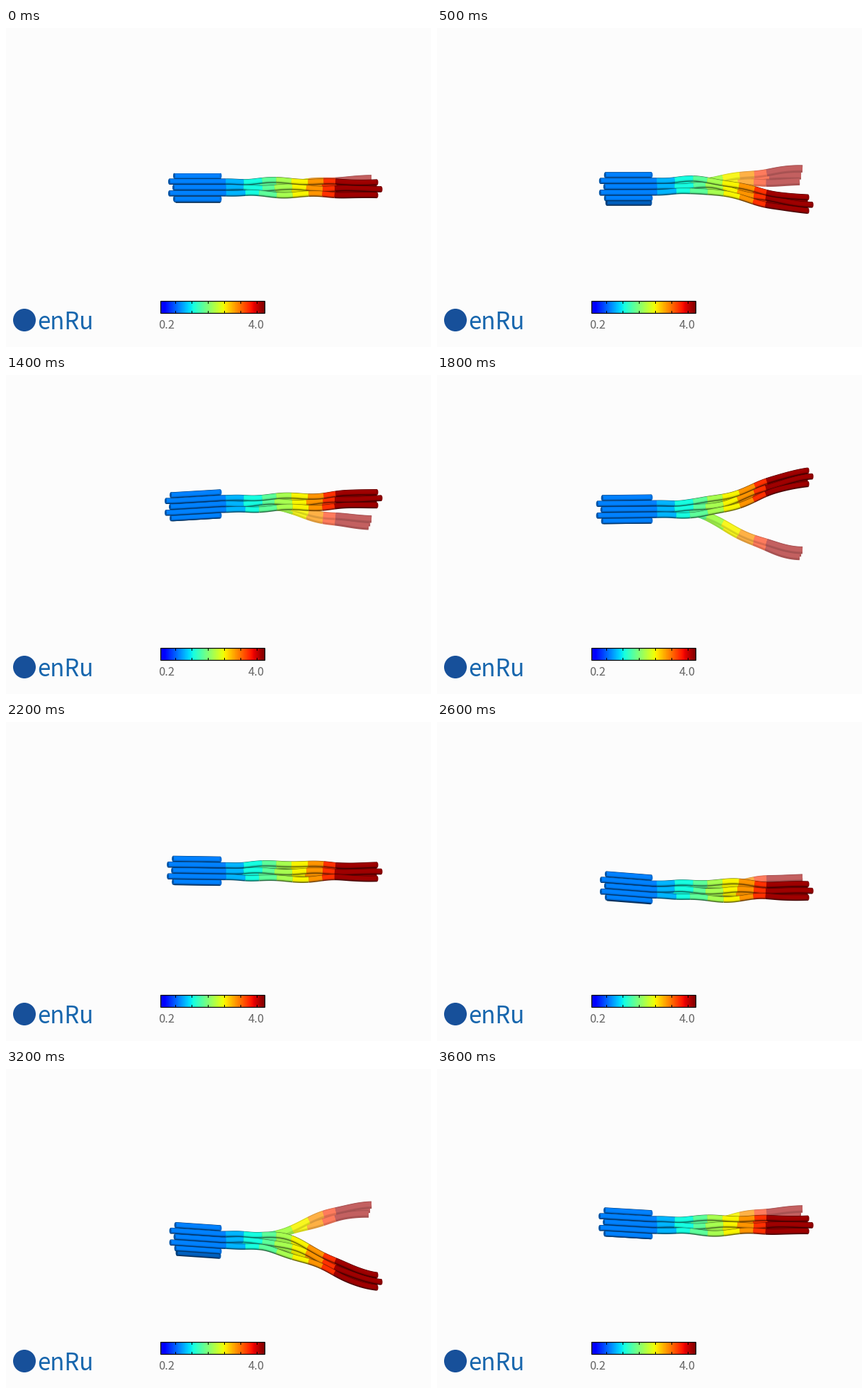
These frames come from a looping animation (600 px wide and 450 px high, 3700 ms). A matplotlib script:

```python
import numpy as np
import matplotlib.pyplot as plt
from matplotlib.animation import FuncAnimation
from matplotlib.collections import LineCollection
from matplotlib.patches import Circle, Ellipse, Rectangle

W, H, DPI = 600, 450, 100
FRAMES, STEP = 37, 100
LOOP = FRAMES * STEP
PX = 72 / DPI
BG = np.full(3, 252 / 255)
JET = plt.get_cmap("jet")

# Poses: time, body height, tilt, sag, front bend, back bend, back fork
POSES = np.array([
    [0, 225, 0, 0, 2, -9, 3],
    [500, 224, 0, -3, 25, -16, 9],
    [1000, 239, 4, 5, 3, -20, 3],
    [1400, 184, -4, -2, -8, 26, 5],
    [1600, 184, -2, -2, -45, 66, 5],
    [2200, 210, 1, 0, 1, -4, 3],
    [2900, 244, 7, 2, 11, -18, 5],
    [3300, 235, 4, 2, 62, -45, 6],
    [3600, 218, 4, 1, 0, -18, 4],
], float)

# Colour bands from the stiff block to the free ends
K = np.arange(9)
EDGES = 308 + 158 * (K[:8] / 7) ** 0.9
BANDS = JET(0.25 + 0.72 * (K / 8) ** 1.25)[:, :3]
JITTER = np.random.default_rng(4).uniform(-3, 3, (12, 8))


def ease(x, a, b):
    u = np.clip((x - a) / (b - a), 0, 1)
    return u * u * (3 - 2 * u)


def bump(x, mid, width):
    return np.exp(-((x - mid) / width) ** 2)


def pose_at(t):
    """Smooth periodic path through the poses."""
    shift = np.eye(7)[0] * LOOP
    keys = np.vstack([POSES[-2:] - shift, POSES, POSES[:2] + shift])
    times, vals = keys[:, 0], keys[:, 1:]
    slope = np.gradient(vals, times, axis=0)
    i = np.searchsorted(times, t, side="right") - 1
    h = times[i + 1] - times[i]
    u = (t - times[i]) / h
    return ((1 + 2 * u) * (1 - u) ** 2 * vals[i] + u * (1 - u) ** 2 * h * slope[i]
            + u * u * (3 - 2 * u) * vals[i + 1] + u * u * (u - 1) * h * slope[i + 1])


fig = plt.figure(figsize=(W / DPI, H / DPI), dpi=DPI, facecolor=BG)
ax = fig.add_axes([0, 0, 1, 1])
ax.axis("off")
live = []


def add(artist):
    live.append(artist)
    ax.add_artist(artist)


def rod(curve, x0, x1, seed, z, width=8.6, shade=1.0, fade=0.0):
    """One shaded tube along curve(x), coloured in bands."""
    cuts = EDGES + JITTER[seed]
    stops = [x0, *cuts[(cuts > x0) & (cuts < x1)], x1]
    lines, colors = [], []
    for a, b in zip(stops[:-1], stops[1:]):
        x = np.linspace(a, b, max(3, int((b - a) / 3)))
        lines.append(np.column_stack([x, curve(x)]))
        mid = (a + b) / 2
        k = fade * ease(mid, 385, 465)
        colors.append(BANDS[np.searchsorted(cuts, mid)] * shade * (1 - k) + BG * k)
    colors = np.array(colors)
    edge = 0.85 if fade else 0.42
    for lift, w, tone in ((0, width, edge), (0.5, width - 1.8, 0.88), (1, width - 4, 1)):
        add(LineCollection([p - [0, lift] for p in lines], colors=colors * tone,
                           linewidths=w * PX, capstyle="butt", zorder=z))
    if not fade:
        for x, c in ((x0, colors[0] * 0.65), (x1, colors[-1] * 0.85)):
            add(Ellipse((x, curve(x)), 3, width - 0.8, fc=c, ec="none", zorder=z))


def update(i):
    while live:
        live.pop().remove()
    t = i * STEP
    body, tilt, sag, front, back, fork = pose_at(t)
    swing = 2 * np.pi * t / LOOP
    left = 231 + 0.12 * (body - 230)
    right = 524
    swell = 1.5 - 2.5 * np.sin(swing)

    def base(x):
        return body + tilt / 2 * np.clip((x - 270) / 34, -1, 1) + sag * bump(x, 380, 40)

    def block_row(dy):
        return lambda x: base(x) + dy

    def ripple(x, n):
        wave = np.sin(2 * np.pi * x / 85 + 2.1 * n + swing * (1 + n % 2))
        return 1.3 * wave * ease(x, 305, 350) * (1 - 0.6 * ease(x, 450, 500))

    def front_row(k, n):
        return lambda x: (base(x) + front * ease(x, 360, 535) + ripple(x, n)
                          + k * (8.3 + ease(x, 440, 525) + swell * bump(x, 400, 45)))

    def back_row(k, n):
        return lambda x: (base(x) + ripple(x, n)
                          + (back + k * fork) * ease(x, 325, 515))

    # pale rods behind
    for n, k in enumerate((0, 1, -1)):
        rod(back_row(k, n), 304, 514 - 2 * k, 5 + n, 1, width=10.5, fade=0.38)

    # short rods of the block, the lowest one rolling into view
    rod(block_row(16 + np.clip(0.4 * front, 0, 6.5)), left + 9, 302, 8, 2, shade=0.75)
    for dy in (16, -16.5):
        rod(block_row(dy), left + 7, 303, 8, 3)

    # long rods: two inner, three in front
    for n, k in enumerate((-0.5, 0.5)):
        rod(front_row(k, 3 + n), left + 9, right - 2, 10 + n, 4, shade=0.9)
    for n, k in enumerate((0, -1, 1)):
        tip = 0 if k else 6
        rod(front_row(k, n), left + tip, right + tip, n, 5)
    return live


# colour scale
ax.imshow(np.linspace(0.09, 1, 256)[None, :], cmap=JET, vmin=0, vmax=1, aspect="auto",
          extent=(218, 365, 402, 385), zorder=1)
ax.add_patch(Rectangle((218, 385), 147, 17, fill=False, ec="black", lw=PX * 1.2, zorder=2))
for x in np.arange(238.5, 355, 23):
    for y in (385, 399):
        ax.plot([x, x], [y, y + 3], color="black", lw=PX, zorder=2)
ax.set_xlim(0, W)
ax.set_ylim(H, 0)


def label(x, y, text, size, color, **kw):
    ax.text(x, y, text, family="Noto Sans CJK JP", size=size * PX, color=color,
            va="baseline", **kw)


label(227, 424, "0.2", 16.5, "#666666", ha="center")
label(353, 424, "4.0", 16.5, "#666666", ha="center")

# mark and wordmark
ax.add_patch(Circle((26, 412), 16, fc="#17509a", ec="none"))
label(44, 425, "enRu", 33, "#1766ad", weight="medium")

anim = FuncAnimation(fig, update, frames=FRAMES, interval=STEP, repeat=True,
                     repeat_delay=0, blit=False)
plt.show()
```
